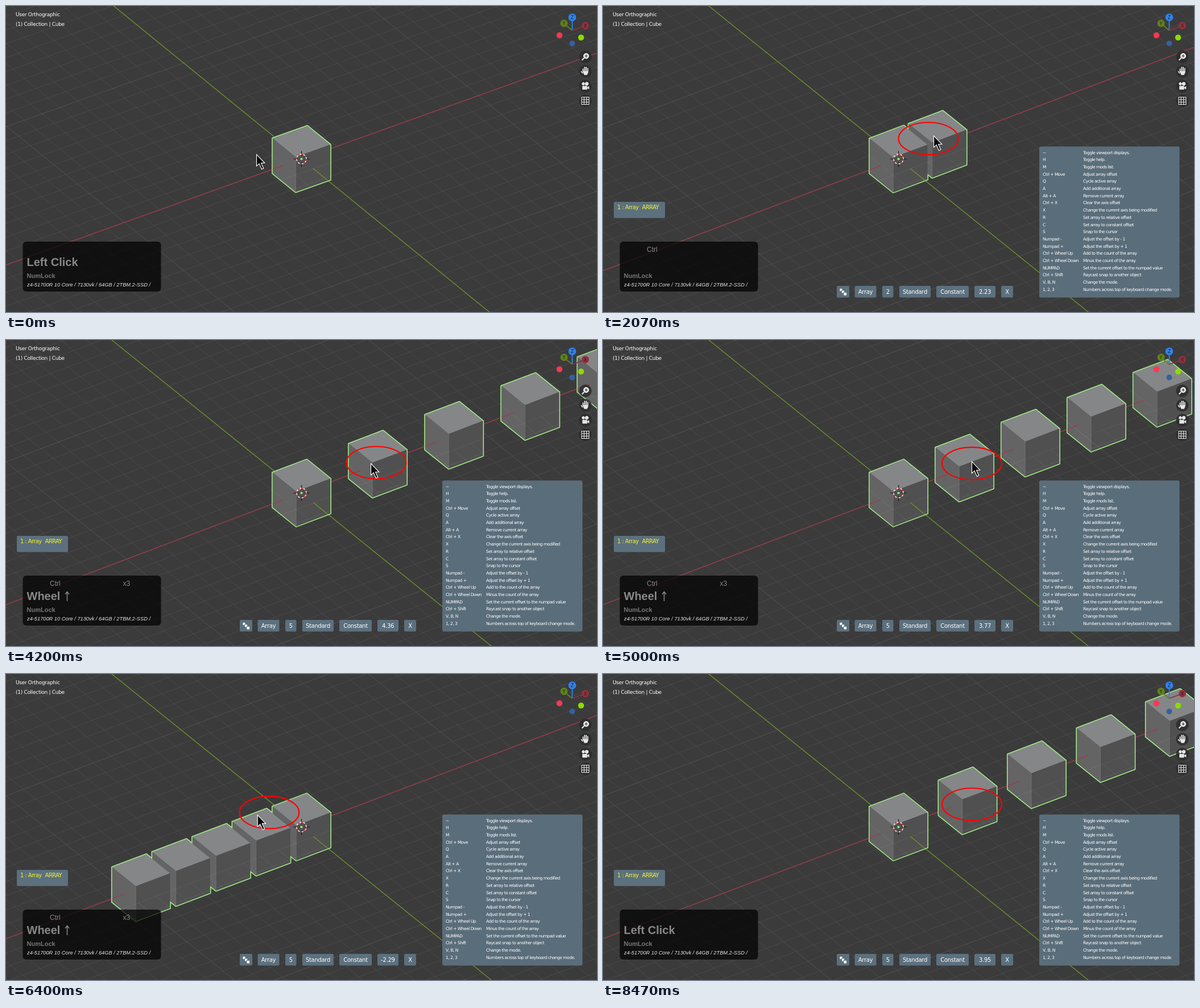
Write an HTML page with a canvas that moves like this. It is 1039 by 539 pixels and loops after 8.67 s.

```html
<!DOCTYPE html>
<html lang="en">
<head>
<meta charset="utf-8">
<title>Array tool</title>
<style>
html, body { margin: 0; width: 100%; height: 100%; overflow: hidden; background: #3b3b3b; }
canvas, svg { position: absolute; left: 0; top: 0; display: block; }
text { font-family: "DejaVu Sans", sans-serif; fill: #fff; white-space: pre; }
.head text { font-size: 9px; letter-spacing: -.3px; }
.bar text { font-size: 10px; letter-spacing: -.3px; text-anchor: middle; }
.bar rect, .panel { fill: #5c707e; }
.help text { font-size: 7.5px; letter-spacing: -.5px; }
.mods text { font-size: 10px; letter-spacing: -.6px; fill: #f2f230; }
.keys text { font-family: "Liberation Sans", Arial, sans-serif; fill: #888; font-size: 12px; }
.keys .big { font-size: 20px; font-weight: bold; }
.keys .lock { font-size: 11px; font-weight: bold; fill: #777; }
.keys .spec { font-size: 9.25px; font-style: italic; fill: #e4e4e4; }
.gizmo text { font-size: 8px; text-anchor: middle; fill: #222; }
</style>
</head>
<body>
<canvas id="view" width="1039" height="539"></canvas>
<svg width="1039" height="539" viewBox="0 0 1039 539">
  <g class="head">
    <text x="17" y="18">User Orthographic</text>
    <text x="17" y="35">(1) Collection | Cube</text>
  </g>

  <g class="gizmo" stroke-width="1.8">
    <path d="M995.5 43V20" stroke="#2f83f0"/>
    <path d="M995.5 43L981 31" stroke="#5f821d"/>
    <path d="M995.5 43L1018.5 34.5" stroke="#93303f"/>
    <circle cx="995.5" cy="66" r="5" fill="#35609f"/>
    <circle cx="981" cy="30.5" r="6.5" fill="#5f821d"/>
    <circle cx="1018.5" cy="34.5" r="6.5" fill="#93303f"/>
    <circle cx="995.5" cy="20" r="6.8" fill="#2f83f0"/>
    <circle cx="973" cy="51.5" r="5.2" fill="#fb3850"/>
    <circle cx="1011" cy="55.5" r="5.2" fill="#8bdc00"/>
    <text x="995.5" y="23">Z</text><text x="981" y="33.5">Y</text><text x="1018.5" y="37.5">X</text>
  </g>

  <g fill="#2b2b2b" fill-opacity=".85">
    <circle cx="1018.5" cy="89.5" r="11"/><circle cx="1018.5" cy="115" r="11"/>
    <circle cx="1018.5" cy="141" r="11"/><circle cx="1018.5" cy="167" r="11"/>
  </g>
  <g fill="#e6e6e6" stroke="#e6e6e6">
    <circle cx="1020" cy="88" r="4.6"/>
    <path d="M1016.5 91.5L1012.5 95.5" stroke-width="2.2"/>
    <path d="M1017.5 88h5M1020 85.5v5" stroke="#2b2b2b" stroke-width="1.2"/>
    <path d="M1014.5 115v-4M1017.3 114v-6M1020 114v-6M1022.7 115v-5M1013.5 118l-2-2.5" stroke-width="1.8" stroke-linecap="round"/>
    <path d="M1013.5 114.5h10v3l-2 4h-5z" stroke="none"/>
    <circle cx="1015" cy="137" r="2.3"/><circle cx="1021" cy="137" r="2.8"/>
    <path d="M1013.5 141h8v6h-8zM1022 143.5l3-2v5l-3-2z" stroke-width=".6"/>
    <path d="M1012 160.5h13v13h-13zM1016.3 160.5v13M1020.7 160.5v13M1012 164.8h13M1012 169.2h13" fill="none" stroke-width="1.1"/>
  </g>

  <g id="hud">
    <g class="mods">
      <rect class="panel" x="19" y="345" width="90" height="28.5" rx="2"/>
      <text x="25" y="358">1 : Array</text><text x="68.500" y="358">ARRAY</text>
    </g>
    <g class="bar" id="bar"></g>
    <g fill="#fff" stroke="#41505b" stroke-width=".6">
      <rect x="416" y="497.5" width="5" height="5"/>
      <rect x="419.5" y="501" width="5" height="5"/>
      <rect x="423" y="504.5" width="5.5" height="5.5"/>
    </g>
    <g class="help" id="help">
      <rect class="panel" x="767" y="247.500" width="246.500" height="266" rx="3" fill-opacity=".95"/>
    </g>
  </g>

  <g class="keys">
    <rect x="29.5" y="415" width="243" height="88" rx="6" fill="#000" fill-opacity=".72"/>
    <text id="mod" x="77" y="432.500"></text>
    <text id="times" x="205.5" y="432.500"></text>
    <text id="key" class="big" x="36.500" y="458"></text>
    <path id="arrow" d="M107.5 460V444M104 448l3.5-4.5l3.5 4.5" fill="none" stroke="#888" stroke-width="1.5"/>
    <text class="lock" x="36.500" y="478.500">NumLock</text>
    <text class="spec" x="37" y="493.5">z4-51700R 10 Core / 7130vk / 64GB / 2TBM.2-SSD /</text>
  </g>

  <ellipse id="ring" rx="52.400" ry="28.500" fill="none" stroke="#f00" stroke-width="2.200"/>
  <path id="mouse" d="M.5 .5V21l4.7-4.300l4.300 9.800l3.300-1.500l-4.200-9.500h6.200z" fill="#0a0a0a" stroke="#fff" stroke-width="1.1"/>
</svg>

<script>
const $ = id => document.getElementById(id);
const ctx = $('view').getContext('2d');
const LOOP = 8670, STEP = 200 / 3, START = 1330;
const CX = 519.5, CY = 269.5;
const HALF = .98; // half a cube edge, leaving room for the outline

// time, array offset, pointer x y, ring x y
const track = [
  [533, 2, 440, 261, 567, 240],
  [870, 2, 572, 236, 567, 240],
  [1330, 2, 572, 236, 567, 240],
  [1730, 3.05, 615, 222, 610, 226],
  [2067, 2.23, 581, 228, 572, 233.5],
  [2400, 9.1, 825, 205, 795, 208],
  [2800, .1, 500, 250, 525, 246],
  [3067, 2.79, 615, 251, 619, 251],
  [3530, 6.2, 735, 215, 728, 217],
  [3800, 6.5, 745, 210, 743, 212],
  [4200, 4.36, 641, 217, 651, 216],
  [4530, .5, 515, 245, 540, 240],
  [4870, 5, 700, 205, 690, 210],
  [5270, .05, 490, 240, 522, 240],
  [5867, 5.57, 714, 202, 695.5, 208.5],
  [6130, 7.5, 780, 190, 770, 195],
  [6470, -3.5, 400, 255, 425, 250],
  [6700, .05, 500, 245, 523, 245],
  [7133, 4.09, 653, 226, 652.5, 228],
  [7270, 3.95, 648, 230, 648.5, 229.5],
  [7530, 3.95, 562, 272, 648.5, 229.5],
  [8130, 3.95, 54, 545, 648.5, 229.5]
];

// Smooth curve through one column, flat at turning points
function sample(t, col) {
  const end = track.length - 1;
  if (t <= track[0][0]) return track[0][col];
  if (t >= track[end][0]) return track[end][col];
  let i = 0;
  while (track[i + 1][0] < t) i++;
  const rise = j => (track[j + 1][col] - track[j][col]) / (track[j + 1][0] - track[j][0]);
  const slope = j => {
    if (j < 1 || j >= end) return 0;
    const a = rise(j - 1), b = rise(j);
    return a * b <= 0 ? 0 : 2 * a * b / (a + b);
  };
  const h = track[i + 1][0] - track[i][0], u = (t - track[i][0]) / h, v = 1 - u;
  return v * v * (1 + 2 * u) * track[i][col] + u * u * (3 - 2 * u) * track[i + 1][col]
    + u * v * h * (v * slope(i) - u * slope(i + 1));
}

// Screen vectors of the X and Y units and the Z height, before and after the orbit
const before = [31.1, -11.17, -20.7, -16.9, 31.4];
const after = [30.75, -11.65, -21.2, -17.13, 31.3];
let axes = after;

const project = (x, y, z) => [
  CX + x * axes[0] + y * axes[2],
  CY + x * axes[1] + y * axes[3] - z * axes[4]
];

function trace(points) {
  ctx.beginPath();
  points.forEach(p => ctx.lineTo(...project(...p)));
}

function fillFace(points, color) {
  trace(points);
  ctx.closePath();
  ctx.fillStyle = color;
  ctx.fill();
}

function lines(keep, color, width) {
  ctx.beginPath();
  for (let i = -50; i <= 50; i++) {
    if (!keep(i)) continue;
    ctx.moveTo(...project(i, -60, 0)); ctx.lineTo(...project(i, 60, 0));
    ctx.moveTo(...project(-60, i, 0)); ctx.lineTo(...project(60, i, 0));
  }
  ctx.strokeStyle = color;
  ctx.lineWidth = width;
  ctx.stroke();
}

function axis(a, b, color) {
  trace([a, b]);
  ctx.strokeStyle = color;
  ctx.lineWidth = 1.4;
  ctx.stroke();
}

function floor() {
  lines(i => i % 10, 'rgba(255,255,255,.065)', 1);
  lines(i => i && i % 10 === 0, 'rgba(255,255,255,.115)', 1);
  axis([-60, 0, 0], [60, 0, 0], '#9b3e4a');
  axis([0, -60, 0], [0, 60, 0], '#6c9029');
}

function outline(x) {
  const a = x - HALF, b = x + HALF, h = HALF;
  trace([[a, h, h], [b, h, h], [b, -h, h], [b, -h, -h], [a, -h, -h], [a, h, -h]]);
  ctx.closePath();
  ctx.strokeStyle = '#a0ea86';
  ctx.lineWidth = 3.2;
  ctx.lineJoin = 'round';
  ctx.stroke();
}

function cube(x) {
  const a = x - HALF, b = x + HALF, h = HALF;
  fillFace([[a, h, h], [b, h, h], [b, -h, h], [a, -h, h]], '#858688');
  fillFace([[a, h, h], [a, -h, h], [a, -h, -h], [a, h, -h]], '#646464');
  fillFace([[a, -h, h], [b, -h, h], [b, -h, -h], [a, -h, -h]], '#505050');
  trace([[a, -h, h], [a, -h, -h]]);
  ctx.strokeStyle = '#777';
  ctx.lineWidth = .8;
  ctx.stroke();
  // The floor shows in front of the lower half
  ctx.save();
  trace([[a, h, 0], [a, -h, 0], [b, -h, 0], [b, -h, -h], [a, -h, -h], [a, h, -h]]);
  ctx.clip();
  floor();
  ctx.restore();
}

function cursor3d() {
  ctx.lineWidth = 1.2;
  ctx.strokeStyle = '#151515';
  ctx.beginPath();
  for (const [dx, dy] of [[1, 0], [-1, 0], [0, 1], [0, -1]]) {
    ctx.moveTo(CX + dx * 6, CY + dy * 6);
    ctx.lineTo(CX + dx * 14, CY + dy * 14);
  }
  ctx.stroke();
  ctx.lineWidth = 1.5;
  for (let i = 0; i < 16; i++) {
    ctx.strokeStyle = i % 2 ? '#fff' : '#e8303c';
    ctx.beginPath();
    ctx.arc(CX, CY, 8.5, i * Math.PI / 8, (i + 1) * Math.PI / 8);
    ctx.stroke();
  }
  ctx.fillStyle = '#8cf068';
  ctx.beginPath();
  ctx.arc(CX, CY, 2.1, 0, 7);
  ctx.fill();
}

function add(parent, tag, attrs, text = '') {
  const node = document.createElementNS('http://www.w3.org/2000/svg', tag);
  for (const k in attrs) node.setAttribute(k, attrs[k]);
  node.textContent = text;
  parent.append(node);
  return node;
}

const [, , count, , , offset] = [
  [411, 22, ''], [442.5, 38, 'Array'], [491, 19.5, '2'], [521, 55, 'Standard'],
  [586, 57, 'Constant'], [653, 37, '2.00'], [700, 21, 'X']
].map(([x, width, label]) => {
  add($('bar'), 'rect', { x, y: 493, width, height: 20.5, rx: 2 });
  return add($('bar'), 'text', { x: x + width / 2, y: 507 }, label);
});

`~|Toggle viewport displays.
H|Toggle help.
M|Toggle mods list.
Ctrl + Move|Adjust array offset
Q|Cycle active array
A|Add additional array
Alt + A|Remove current array
Ctrl + X|Clear the axis offset
X|Change the current axis being modified
R|Set array to relative offset
C|Set array to constant offset
S|Snap to the cursor
Numpad -|Adjust the offset by - 1
Numpad +|Adjust the offset by + 1
Ctrl + Wheel Up|Add to the count of the array
Ctrl + Wheel Down|Minus the count of the array
NUMPAD|Set the current offset to the numpad value
Ctrl + Shift|Raycast snap to another object
V, B, N|Change the mode.
1, 2, 3|Numbers across top of keyboard change mode.`.split('\n').forEach((row, i) => {
  const [key, use] = row.split('|'), y = 260.7 + i * 12.68;
  add($('help'), 'text', { x: 773, y }, key);
  add($('help'), 'text', { x: 844, y }, use);
});

function draw(t) {
  const active = t >= START, clicked = t < 595 || t >= 8460;
  const wheel = [3530, 3660, 3800].filter(w => t >= w).length;
  const copies = active ? 2 + wheel : 1;
  const gap = sample(t, 1);
  const turn = Math.min(1, t / 333);
  axes = before.map((v, i) => v + (after[i] - v) * turn);

  ctx.fillStyle = '#3b3b3b';
  ctx.fillRect(0, 0, 1039, 539);
  floor();
  const spots = Array.from({ length: copies }, (_, i) => i * gap).sort((a, b) => b - a);
  spots.forEach(outline);
  spots.forEach(cube);
  cursor3d();

  const show = (id, on) => $(id).style.display = on ? '' : 'none';
  show('hud', active);
  show('ring', active);
  show('arrow', wheel && !clicked);
  count.textContent = copies;
  offset.textContent = gap.toFixed(2);
  $('mod').textContent = t >= 790 && !clicked ? 'Ctrl' : '';
  $('times').textContent = wheel > 1 && !clicked ? 'x' + wheel : '';
  $('key').textContent = clicked ? 'Left Click' : wheel ? 'Wheel' : '';
  $('mouse').setAttribute('transform', `translate(${sample(t, 2)} ${sample(t, 3)})`);
  $('ring').setAttribute('cx', sample(t, 4));
  $('ring').setAttribute('cy', sample(t, 5));
}

let last = -1;
function tick() {
  const k = Math.floor((performance.now() % LOOP + 5) / STEP);
  if (k !== last) draw((last = k) * STEP);
  requestAnimationFrame(tick);
}
tick();
</script>
</body>
</html>
```
